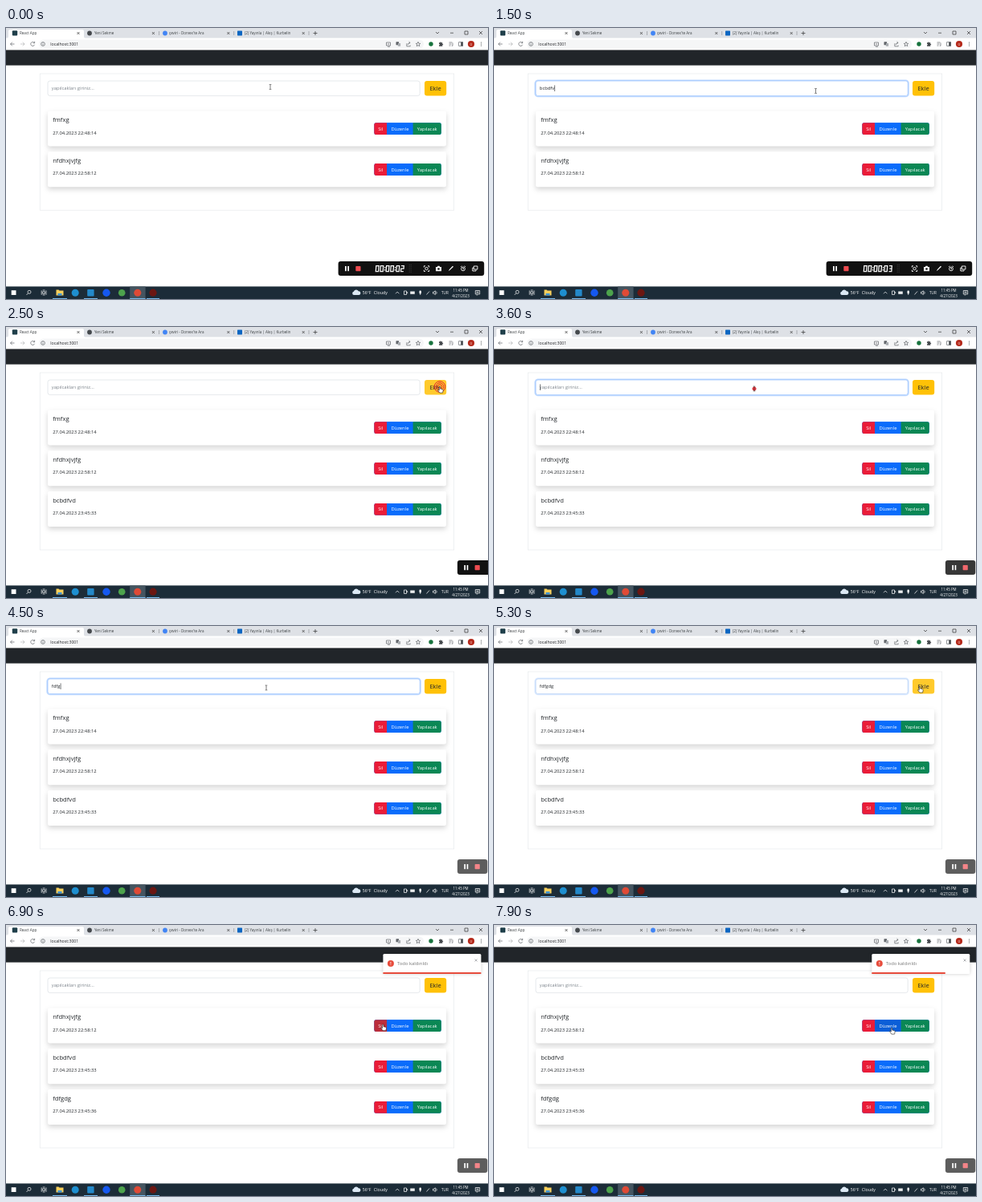
Recreate the animation shown at these times as an HTML page. Size 600 px wide and 338 px high, loop 8000 ms.

```html
<!DOCTYPE html>
<html lang="tr">
<head>
<meta charset="utf-8">
<title>Todo</title>
<style>
html, body { margin: 0; width: 100%; height: 100%; overflow: hidden; background: #fff; }
svg { display: block; width: 600px; height: 338px; font-family: "Open Sans", "Noto Sans", sans-serif; }
.ui { fill: none; stroke: #5f6368; stroke-width: .7; }
.tray { fill: none; stroke: #fff; stroke-width: .7; }
.card { filter: drop-shadow(0 3px 3px rgba(0, 0, 0, .17)); }
.toast { filter: drop-shadow(0 .4px 2px rgba(0, 0, 0, .2)); }
</style>
</head>
<body>
<svg id="stage" viewBox="0 0 600 338" xmlns="http://www.w3.org/2000/svg"></svg>
<script>
const LOOP = 8000, ROW = 50.8;
const DOWN = [150, 2250, 3430, 5240, 6330];
const UP = [300, 2350, 3560, 5400, 6420];
const [, ADD1, , ADD2, REMOVE] = UP;
const TOAST_IN = 6450, TOAST_READY = 7150;

const items = [
  { title: 'fmfxg', date: '27.04.2023 22:48:14', from: 0, to: REMOVE },
  { title: 'nfdhxjvjfg', date: '27.04.2023 22:58:12', from: 0, to: LOOP },
  { title: 'bcbdfvd', date: '27.04.2023 23:45:33', from: ADD1, to: LOOP },
  { title: 'fdfgdg', date: '27.04.2023 23:45:36', from: ADD2, to: LOOP }
];

const actions = [
  { label: 'Sil', x: 458.3, w: 15.9, fill: '#ea1c38', hover: '#bb2d3b' },
  { label: 'Düzenle', x: 474.2, w: 32.4, fill: '#0a6cfb', hover: '#0b5ed7' },
  { label: 'Yapılacak', x: 506.6, w: 35.2, fill: '#0a8754', hover: '#157347' }
];

const typing = [
  [0, ''], [1000, 'b'], [1100, 'bc'], [1300, 'bcb'], [1400, 'bcbdf'], [1500, 'bcbdfv'], [1600, 'bcbdfvd'],
  [ADD1, ''], [4100, 'f'], [4200, 'fd'], [4300, 'fdf'], [4500, 'fdfg'], [4600, 'fdfgd'], [4700, 'fdfgdg'], [ADD2, '']
];

const pointer = [
  [0, 329, 73.5], [100, 329, 73.5], [200, 335, 75], [300, 335, 75], [600, 400.5, 78.5], [1500, 400.5, 78.5],
  [2100, 540, 74.5], [2600, 540, 74.5], [3350, 324, 77], [4700, 324, 77], [5200, 530, 75.5],
  [5550, 530, 75.5], [6200, 458.6, 122.3], [6650, 458.6, 122.3], [7350, 495, 128.5]
];

const rect = (x, y, w, h, fill, more = '') =>
  `<rect x="${x}" y="${y}" width="${w}" height="${h}" fill="${fill}" ${more}/>`;
const circle = (x, y, r, fill, more = '') => `<circle cx="${x}" cy="${y}" r="${r}" fill="${fill}" ${more}/>`;
const text = (x, y, size, str, fill = '#212529', more = '') =>
  `<text x="${x}" y="${y}" font-size="${size}" fill="${fill}" ${more}>${str}</text>`;
const path = (d, more = '') => `<path d="${d}" ${more}/>`;
const cross = (x, y, r) => `M${x - r} ${y - r}l${2 * r} ${2 * r}m0 ${-2 * r}l${-2 * r} ${2 * r}`;
const MID = 'text-anchor="middle"';

function browser() {
  const tabs = [[17, 'React App'], [110, 'Yeni Sekme'], [203, "çeviri - Dorvex'te Ara"], [297, '(2) Yayınla | Akış | Kurbelin']];
  return rect(0, 0, 600, 13, '#dee1e6') + rect(0, 12.5, 600, 14.8, '#fff') +
    path('M1 13Q3 13 3 10V4Q3 2 5 2H95Q97 2 97 4V10Q97 13 99 13Z', 'fill="#fff"') +
    tabs.map(([x, s], i) => text(x, 8.2, 4.55, s, '#3c4043') +
      path(cross(90 + i * 93.4, 6.5, 1.5), 'class="ui" style="stroke:#333"')).join('') +
    path('M190.5 4v5M283.7 4v5M377 4v5', 'class="ui" opacity=".6"') +
    rect(7.8, 3.2, 6.4, 6.4, '#1f3f4a', 'rx="1"') + circle(104, 6.5, 2.9, '#45494d') +
    circle(198, 6.5, 2.9, '#4285f4') + rect(288, 3.4, 6, 6, '#0a66c2', 'rx=".6"') +
    path('M385 4v5M382.5 6.5h5M535 5l2 2 2-2M553 6.2h4M571 4h4v4h-4Z' + cross(591, 6, 2), 'class="ui" style="stroke:#333"') +
    rect(41, 14.5, 479, 11, '#f5f6f7', 'rx="5.5"') +
    path('M10.5 20h-5m2.3-2.3L5.5 20l2.3 2.3', 'class="ui"') +
    path('M18 20h5m-2.3-2.3L23 20l-2.3 2.3', 'class="ui" opacity=".45"') +
    path('M35.3 18.5a2.5 2.5 0 1 0 .3 2.3M35.6 16.8v2h-2', 'class="ui"') +
    circle(46, 20, 2.4, 'none', 'class="ui"') + path('M46 19.6v1.9M46 18.4v.6', 'class="ui"') +
    text(55.3, 22.2, 5.2, 'localhost:3001', '#202124') +
    path('M473.5 18h5v4h-5ZM475 23.2h3M476 19v2M498.8 19.2v3.6h4.4v-1.3M500 21q.5-2.6 3-2.6m-1.4-1.4 1.5 1.4-1.5 1.4', 'class="ui"') +
    rect(485.5, 17.3, 3.6, 4, '#5f6368', 'rx=".5"') + rect(487.8, 19, 3.3, 3.8, '#a9adb1', 'rx=".5"') +
    path('M513 17.3l.8 1.9 2 .2-1.5 1.3.5 2-1.8-1.1-1.8 1.1.5-2-1.5-1.3 2-.2Z', 'class="ui"') +
    circle(529, 20, 2.7, '#17733d') +
    path('M539 18.3h1.5v-.8h1.2v.8h1.6v1.6h.8v1.2h-.8v1.7H539v-1.6h.8v-1.2h-.8Z', 'fill="#45494d"') +
    path('M551.5 18h4M551.5 20h3M551.5 22h2M556 18.5v3.7h-1.2', 'class="ui"') +
    rect(563.7, 17.7, 5, 4.6, 'none', 'class="ui"') + rect(566.2, 17.7, 2.5, 4.6, '#45494d') +
    circle(579, 20, 4.1, '#b52a1c') + text(579, 21.7, 4.6, 'o', '#f3cfc8', MID) +
    [18, 20, 22].map(y => circle(591.5, y, .55, '#45494d')).join('');
}

function taskbar() {
  const white = 'class="tray"';
  return rect(0, 322.4, 600, 15.6, '#1c2c38') + rect(154.2, 322.4, 19.4, 15.6, '#455560') +
    rect(6.7, 327.2, 5.8, 5.8, '#fff') +
    circle(29, 329.3, 2, 'none', white) + path('M27.5 330.8l-2 2.2M44.2 327.4v5.4M50 327.4v5.4M45.7 328.8h2.8v2.6h-2.8ZM45.7 327h2.8M45.7 333h2.8', white) +
    path('M62.5 326.5h3l1 1h5v6h-9Z', 'fill="#f8cf5b"') + rect(64.5, 331, 5, 2.5, '#3b94d9') +
    circle(86.2, 330.2, 4.5, '#1e8fd0') + rect(101.2, 326, 8.4, 8.4, '#2489ca', 'rx="1"') +
    circle(125, 330.2, 4.7, '#1558f0') + circle(144.2, 330.2, 4.3, '#4da34c') +
    circle(163.8, 330.2, 4.5, '#df4a36') + circle(183, 330.2, 4.6, '#6b1712') +
    [[58, 18], [97, 17], [154.2, 19.4], [175, 16]].map(([x, w]) => rect(x, 337, w, 1, '#76b9ed')).join('') +
    path('M433 333a2.2 2.2 0 0 1-.2-4.3 3.2 3.2 0 0 1 6-.4 2.3 2.3 0 0 1 .5 4.7Z', 'fill="#dbe8f4"') +
    text(443.8, 332, 5.1, '56°F', '#fff') + text(457.8, 332, 5.3, 'Cloudy', '#fff') +
    path('M485 331.3l2.2-2.2 2.2 2.2M495.5 328h3v4.5h-3ZM498.5 329.5h1.2v1.8M503.5 328.8h5v2.8h-5ZM523.5 332.5l3.5-4M531.5 329.2h1.2l1.6-1.4v4.8l-1.6-1.4h-1.2ZM535.6 328.6q1.2 1.6 0 3.2', white) +
    rect(504, 329.2, 4, 2, '#fff') + rect(514.5, 327.4, 2.4, 4, '#fff', 'rx="1"') + path('M515.7 331v2', white) +
    text(542, 332, 4.6, 'TUR', '#fff') +
    text(566, 328.7, 4.45, '11:45 PM', '#fff', MID) + text(566, 335.6, 4.55, '4/27/2023', '#fff', MID) +
    path('M584.3 327.5h5.4v4.5h-2.2l-1.2 1.3v-1.3h-2ZM585.5 329h3M585.5 330.5h3', white);
}

function card(item, i) {
  return `<g id="card${i}">` + rect(52, 103.4, 496, 44, '#fff', 'rx="2.3" class="card"') +
    text(58.2, 117.4, 7.6, item.title, '#212529', 'font-weight="500"') +
    text(58.2, 132.7, 5.85, item.date) +
    rect(458.3, 118.3, 83.5, 14.8, actions[1].fill, 'rx="2.3"') +
    actions.map((a, k) => {
      const l = a.x, r = a.x + a.w, d = [
        `M${r} 118.3H${l + 2.3}q-2.3 0-2.3 2.3v10.2q0 2.3 2.3 2.3H${r}Z`,
        `M${l} 118.3H${r}v14.8H${l}Z`,
        `M${l} 118.3H${r - 2.3}q2.3 0 2.3 2.3v10.2q0 2.3-2.3 2.3H${l}Z`][k];
      return path(d, `class="act" fill="${a.fill}"`) + text(l + a.w / 2, 127.9, 5.8, a.label, '#fff', MID);
    }).join('') + '</g>';
}

// Strokes of the LCD digits the timer can show
const LCD = {
  0: 'M0 0H3.3V7H0Z', 2: 'M0 0H3.3V3.5H0V7H3.3',
  3: 'M0 0H3.3V7H0M.5 3.5H3.3', 4: 'M0 0V3.5H3.3M3.3 0V7'
};

function recorder() {
  const digit = (x, more = '') => path(LCD[0], `transform="translate(${x})" ${more}`);
  const white = 'fill="none" stroke="#fff" stroke-width=".9"';
  return '<g id="rec">' + rect(413.6, 291, 181.6, 18, '#111', 'rx="3" id="recBox"') +
    rect(422, 297, 1.7, 6.2, '#fff') + rect(425.3, 297, 1.7, 6.2, '#fff') + rect(435.3, 297, 6.2, 6.2, '#ee4b50', 'rx=".8"') +
    '<g id="tools"><g transform="translate(460.8 296.5) skewX(-4)" fill="none" stroke="#fff" stroke-width="1.25">' +
    [0, 5.6, 12.8, 18.4, 25.6].map(x => digit(x)).join('') + digit(31.2, 'id="sec"') +
    path('M11.1 1.6v1.3M11.1 4.6v1.3M23.9 1.6v1.3M23.9 4.6v1.3') + '</g>' +
    path('M502.2 295v11M504.2 295v11', 'stroke="#555" stroke-width=".7" stroke-dasharray="1 1.2"') +
    path('M520.3 298.5v-1.7h1.7M525 296.8h1.7v1.7M526.7 301.8v1.7H525M522 303.5h-1.7v-1.7', white) + circle(523.5, 300.1, 1.7, 'none', white) +
    path('M535 298h1.8l.7-1.2h2l.7 1.2h1.8v5.2h-7Z', 'fill="#fff"') + circle(538.5, 300.5, 1.3, '#111') +
    path('M550.8 303.2l1.2-2.2 4-4.2 1 1-4.2 4Z', 'fill="#fff"') +
    circle(569, 300.4, 2.4, 'none', white) + path('M569 299v1.5h1M566 298l1.4-1.2M572 298l-1.4-1.2', white) +
    path('M582.3 297h4.6v4h-4.6ZM582 299h-1.2v4h4.2v-1.5', white) + '</g></g>';
}

function toast() {
  return '<g id="toast">' + rect(470.3, 36, 122, 25, '#fff', 'rx="1.5" class="toast"') +
    circle(479.8, 48.1, 4, '#e74c3c') + path('M479.8 45.9v2.5M479.8 49.3v.9', 'stroke="#fff" stroke-width=".8"') +
    text(487.8, 50.2, 5.85, 'Todo kaldırıldı', '#757575') +
    path(cross(586, 44, 1.5), 'class="ui" opacity=".7"') +
    rect(470.3, 59, 122, 2, '#e74c3c', 'id="bar"') + '</g>';
}

const cursors = {
  beam: path('M-1.3-3H-.3L0-2.7.3-3H1.3M0-2.7V2.7M-1.3 3H-.3L0 2.7.3 3H1.3', 'fill="none" stroke="#222" stroke-width=".6"'),
  hand: path('M-.7.6Q-.7-.2 0-.2T.7.6V2.6L3.6 3.3Q4.3 3.6 4.2 4.5L3.6 7.6H-.2L-2.3 4.6Q-2.6 3.8-1.8 3.8L-.7 4.6Z', 'fill="#fff" stroke="#111" stroke-width=".55"'),
  arrow: path('M0 0V6L1.4 4.8 2.3 6.9 3.2 6.5 2.3 4.5H4.2Z', 'fill="#fff" stroke="#111" stroke-width=".5"')
};

const stage = document.getElementById('stage');
stage.innerHTML = rect(0, 0, 600, 338, '#fff') + '<g id="page">' +
  rect(42.2, 57, 515.5, 170, '#fff', 'id="frame" stroke="#e3e6e9" stroke-width=".6"') +
  rect(51.2, 65.2, 464.8, 20.3, 'none', 'id="ring" rx="3.6" stroke="#0d6efd" stroke-opacity=".27" stroke-width="1.6"') +
  rect(52, 66, 463.2, 18.6, '#fff', 'id="field" rx="2.8" stroke-width=".6"') +
  text(56.8, 77.4, 5.85, 'yapılcakları giriniz...', '#7b838a', 'id="hint"') +
  text(56.8, 77.4, 5.85, '', '#212529', 'id="typed"') + rect(57, 71.4, .6, 7.6, '#212529', 'id="caret"') +
  rect(521, 66, 27.2, 18.6, '#ffc107', 'rx="3" id="add"') + text(534.6, 78.1, 7.6, 'Ekle', '#212529', MID) +
  items.map(card).join('') + '</g>' + rect(0, 27.2, 600, 19.4, '#212529') +
  '<g id="scroll">' + rect(593.4, 27.2, 6.6, 295.3, '#f1f1f1') + rect(594.2, 34, 5, 270, '#c1c1c1') +
  path('M595 31.5l1.7-2 1.7 2ZM595 318l1.7 2 1.7-2Z', 'fill="#505050"') + '</g>' +
  toast() + browser() + taskbar() + recorder() +
  '<g id="ripple" fill="none" stroke="#e3262e" stroke-width="1">' + [1, .7, .4].map(k => circle(0, 0, 1, 'none', `data-k="${k}"`)).join('') + '</g>' +
  '<g id="cursor">' + Object.entries(cursors).map(([k, d]) => `<g id="${k}">${d}</g>`).join('') + '</g>';

const el = {};
stage.querySelectorAll('[id]').forEach(n => el[n.id] = n);
const rings = [...el.ripple.children];
const set = (n, attrs) => { for (const k in attrs) n.setAttribute(k, attrs[k]); };
const show = (n, on) => n.style.display = on ? '' : 'none';
const move = (n, x, y = 0) => set(n, { transform: `translate(${x} ${y})` });
const part = (t, a, b) => Math.min(1, Math.max(0, (t - a) / (b - a)));
const smooth = p => p * p * (3 - 2 * p);
const outCubic = p => 1 - (1 - p) ** 3;
const inside = (x, y, l, top, w, h) => x >= l && x <= l + w && y >= top && y <= top + h;

function along(keys, t, ease) {
  let i = keys.findIndex(k => k[0] > t);
  if (i < 0) return keys[keys.length - 1].slice(1);
  const a = keys[i - 1], b = keys[i], p = ease(part(t, a[0], b[0]));
  return a.slice(1).map((v, k) => v + (b[k + 1] - v) * p);
}

const bounce = [[0, 1172, 0], [.6, -9.8, 1], [.75, 3.9, 1], [.9, -2, 1], [1, 0, 1]];

function drawField(t) {
  const focus = part(t, DOWN[0], DOWN[0] + 150) - part(t, DOWN[1], DOWN[1] + 150) +
    part(t, DOWN[2], DOWN[2] + 150) - part(t, DOWN[3], DOWN[3] + 150);
  const hasCaret = (t >= DOWN[0] && t < DOWN[1]) || (t >= DOWN[2] && t < DOWN[3]);
  const value = typing.filter(k => k[0] <= t).pop()[1];
  const mix = (a, b) => Math.round(a + (b - a) * focus);
  set(el.field, { stroke: `rgb(${mix(214, 134)},${mix(219, 183)},${mix(224, 254)})` });
  el.ring.style.opacity = focus;
  if (el.typed.textContent !== value) el.typed.textContent = value;
  show(el.hint, !value);
  show(el.caret, hasCaret);
  set(el.caret, { x: 57 + (value ? el.typed.getComputedTextLength() : 0) });
}

function drawList(t, x, y) {
  const live = items.filter(it => t >= it.from && t < it.to);
  const shift = live.length > 3 ? -3.2 : 0;
  const px = x - shift;
  let over = inside(px, y, 521, 66, 27.2, 18.6);
  move(el.page, shift);
  show(el.scroll, shift);
  set(el.frame, { height: 68.6 + ROW * live.length });
  set(el.add, { fill: over ? '#ffca2c' : '#ffc107' });
  items.forEach((it, i) => {
    const node = el['card' + i], row = live.indexOf(it);
    show(node, row >= 0);
    if (row < 0) return;
    move(node, 0, row * ROW);
    node.querySelectorAll('.act').forEach((b, k) => {
      const a = actions[k], hit = inside(px, y, a.x, 118.3 + row * ROW, a.w, 14.8);
      set(b, { fill: hit ? a.hover : a.fill });
      over = over || hit;
    });
  });
  move(el.cursor, x, y);
  const kind = over ? 'hand' : inside(px, y, 52, 66, 463, 18.6) ? 'beam' : 'arrow';
  for (const k in cursors) show(el[k], k === kind);
}

function drawRipple(t) {
  const start = UP.find(u => t >= u && t < u + 250);
  show(el.ripple, start !== undefined);
  if (start === undefined) return;
  const age = t - start;
  move(el.ripple, ...along(pointer, start, smooth));
  el.ripple.style.opacity = 1 - part(age, 160, 250);
  rings.forEach(c => set(c, { r: c.dataset.k * (.3 + age * .043) }));
}

function drawRecorder(t) {
  const docked = t >= 2600;
  move(el.rec, 148.3 * smooth(part(t, 1700, 2200)));
  set(el.recBox, { width: docked ? 37.4 : 181.6 });
  show(el.tools, !docked);
  set(el.sec, { d: LCD[t < 600 ? 2 : t < 1600 ? 3 : 4] });
  el.rec.style.opacity = 1 - .32 * part(t, 3300, 3900);
}

function drawToast(t) {
  show(el.toast, t >= TOAST_IN);
  const [dx, alpha] = along(bounce, part(t, TOAST_IN, TOAST_READY), outCubic);
  move(el.toast, dx);
  el.toast.style.opacity = alpha;
  set(el.bar, { width: 122 * (1 - part(t, TOAST_READY, TOAST_READY + 3000)) });
}

function render(t) {
  const [x, y] = along(pointer, t, smooth);
  drawField(t);
  drawList(t, x, y);
  drawRipple(t);
  drawRecorder(t);
  drawToast(t);
}

const begin = performance.now();
function tick() {
  render((performance.now() - begin) % LOOP);
  requestAnimationFrame(tick);
}
tick();
</script>
</body>
</html>
```
